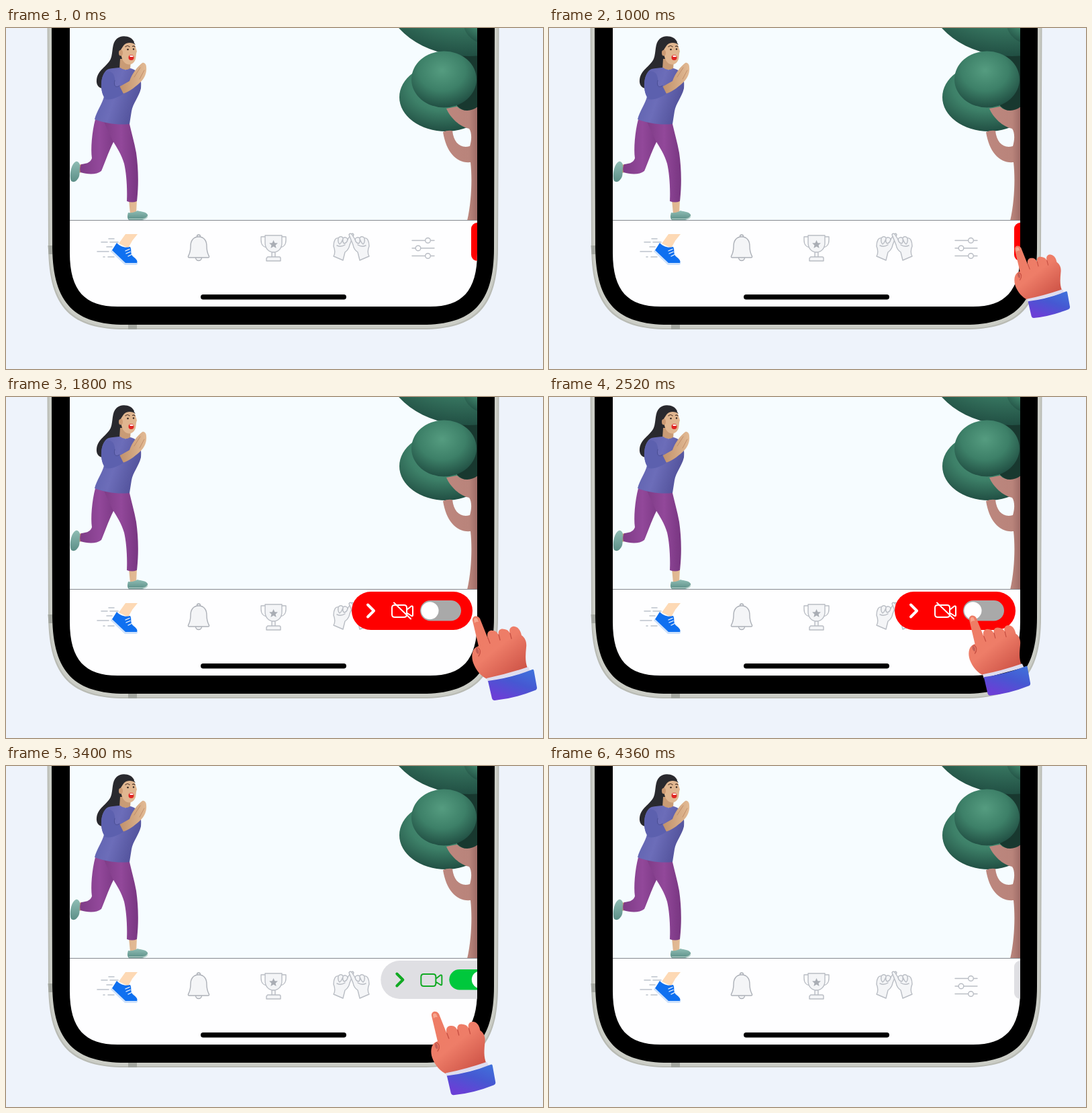
Animation, 800 px wide and 508 px high, one loop 4.4 s. Source, as an HTML page:

```html
<!DOCTYPE html>
<html lang="en">
<head>
<meta charset="utf-8">
<title>Running app tab bar</title>
<style>
  html, body { margin: 0; width: 100%; height: 100%; overflow: hidden; background: #eef3fb; }
  svg { display: block; width: 800px; height: 508px; }
  .line { fill: none; stroke-linecap: round; stroke-linejoin: round; }
  .icon { fill: #f4f5f7; stroke: #b9bdc4; stroke-width: 1.4; stroke-linecap: round; stroke-linejoin: round; }
</style>
</head>
<body>
<svg viewBox="0 0 800 508">
  <defs>
    <clipPath id="screen"><path d="M95 -1V335C95 392 118 415 166 415H632C679 415 702 392 702 335V-1Z"/></clipPath>
    <radialGradient id="leaf" cx=".47" cy=".34" r=".66">
      <stop offset="0" stop-color="#559c80"/><stop offset=".55" stop-color="#3d8068"/><stop offset="1" stop-color="#214f43"/>
    </radialGradient>
    <linearGradient id="bark"><stop offset="0" stop-color="#bd877e"/><stop offset=".75" stop-color="#b9847b"/><stop offset="1" stop-color="#9c6a65"/></linearGradient>
    <linearGradient id="shirt" x2="1" y2=".4"><stop offset="0" stop-color="#5a5eab"/><stop offset=".55" stop-color="#6c6db9"/><stop offset="1" stop-color="#53539c"/></linearGradient>
    <linearGradient id="pants"><stop offset="0" stop-color="#7f3c87"/><stop offset=".5" stop-color="#92489a"/><stop offset="1" stop-color="#783681"/></linearGradient>
    <linearGradient id="skin"><stop offset="0" stop-color="#bf8f69"/><stop offset="1" stop-color="#e3bb95"/></linearGradient>
    <linearGradient id="shoe" x2="0" y2="1"><stop offset="0" stop-color="#8fbdb4"/><stop offset="1" stop-color="#5c8f88"/></linearGradient>
    <linearGradient id="palm" x2=".7" y2="1"><stop offset="0" stop-color="#ee7c64"/><stop offset=".55" stop-color="#ee7d68"/><stop offset="1" stop-color="#cf5548"/></linearGradient>
    <linearGradient id="sleeve" x1="1" x2=".4" y2="1"><stop offset="0" stop-color="#3f74dc"/><stop offset=".5" stop-color="#4658d2"/><stop offset="1" stop-color="#6a3fd6"/></linearGradient>
  </defs>

  <!-- phone body -->
  <path fill="#b9bbb4" d="M61.500 -1L63 328C64 418 98 449 178 449H620C699 449 733 418 733 328L734.500 -1Z"/>
  <path fill="#cbcdc6" d="M63.500 -1L65 328C66 416 100 447 178 447H620C697 447 731 416 731 328L732.500 -1Z"/>
  <path fill="#a3a69f" d="M62.500 324H69V337H63.500ZM182 442H195V449H182Z"/>
  <path d="M68 -1L69 328C70 411 103 442 178 442H620C694 442 727 411 727 328L728 -1Z"/>

  <g clip-path="url(#screen)">
    <path fill="#f6fcff" d="M95 -1H703V287H95Z"/>
    <path fill="#fefeff" d="M95 286H703V416H95Z"/>

    <!-- tree -->
    <path fill="#18382f" d="M668 40H703V140H668Z"/>
    <ellipse cx="655" cy="103" rx="69" ry="51" fill="url(#leaf)"/>
    <path fill="#18382f" d="M676 60H703V124C692 128 680 124 672 116Z"/>
    <path fill="url(#bark)" d="M687 287C693 262 695 226 692 200C672 202 656 186 651 155Q657 152 665 153C667 171 677 180 691 176C694 166 694 156 690 150C676 147 662 134 656 120L672 117C680 125 694 125 703 117V287Z"/>
    <ellipse cx="690" cy="-50" rx="125" ry="92" fill="url(#leaf)"/>
    <ellipse cx="722" cy="-6" rx="40" ry="31" fill="url(#leaf)"/>
    <ellipse cx="652.500" cy="76.500" rx="48.500" ry="42" fill="url(#leaf)"/>

    <!-- runner -->
    <path fill="url(#skin)" d="M183 256H195L194 277H185ZM107 204L114 203 113 215 107 216Z"/>
    <path fill="url(#shoe)" d="M182 275C188 276 192 274 196 272C201 274 208 273 211 278C212 283 208 285 203 286H183C180 283 181 279 182 275Z"/>
    <path fill="url(#shoe)" d="M104 199C108 198 111 203 110 208C109 215 111 221 106 226C102 231 96 230 96 224C95 214 98 202 104 199Z"/>
    <path fill="none" stroke="#c3d8d2" stroke-width="1.200" d="M183 284.500H204Q210 284 211 280"/>
    <path fill="url(#pants)" d="M133 136C128 155 126 180 128 194C125 202 118 202 112 203Q109 209 111 215C121 218 135 219 142 213C146 204 152 186 160 170L168 144Z"/>
    <path fill="url(#pants)" d="M146 140L184 143C187 156 191 170 194 186C197 207 198 232 195 258Q188 261 180 258C181 236 179 215 176 202C172 188 165 178 159 168Z"/>
    <path fill="#29292e" d="M191 21C188 12 172 9 165 16C157 23 160 36 156 46C150 58 137 62 135 77C134 85 139 90 144 90C149 82 153 74 160 66C172 62 178 50 177 40Z"/>
    <path fill="#c99b75" d="M170 46H186L185 62H169Z"/>
    <path fill="url(#shirt)" d="M153 61C158 60 165 59 170 59Q177 65 185 60C196 62 203 72 201 90C198 103 189 112 187 124L184 143C166 145 148 142 132 136C135 124 144 112 146 102C139 92 141 65 153 61Z"/>
    <path fill="url(#skin)" d="M168 88L184 79C187 69 196 57 203 52C206 51 209 54 209 58C210 66 207 75 199 82C191 89 181 97 173 98Z"/>
    <path class="line" stroke="#b98560" stroke-width=".8" d="M200 59L191 73M206 63L199 76"/>
    <path fill="#5c60ae" d="M148 66C140 73 140 96 148 106C156 108 168 103 175 98L169 86C163 89 160 87 162 78C163 70 156 61 148 66Z"/>
    <path class="line" stroke="#4a4e94" d="M162 78C160 86 163 90 169 86"/>
    <path fill="#e0b690" d="M172 24C178 17 189 18 192 25C193 29 194 31 195 35C194 37 194 39 193.500 43C193 51 187 56 181 54C174 52 169 42 172 24Z"/>
    <ellipse cx="171" cy="37" rx="3" ry="4.500" fill="#cd9b74"/>
    <path fill="#29292e" d="M193 25C189 17 176 12 168 20L168 34C173 33 173 26 179 23C184 21 189 22 193 25Z"/>
    <path class="line" stroke="#4c3429" stroke-width="1.100" d="M178 28Q181 25 184 28M188.500 27.500Q190 26 192 28"/>
    <circle cx="181.500" cy="32" r="1.300" fill="#33251f"/><circle cx="190" cy="31.500" r="1.200" fill="#33251f"/>
    <ellipse cx="186.500" cy="44" rx="4" ry="4" fill="#e02624"/>
    <path fill="#fff" d="M184 41.500Q187 40 190 42L189 43H185Z"/>

    <path fill="#85898f" d="M95 286H703V287H95Z"/>

    <!-- running foot -->
    <path class="line" stroke="#bcc2cb" stroke-width="1.600" d="M142 319H151M155 319H167M153 314H161M136 333H153M157 333H160M150 326H158M145 341H147M152 341H161"/>
    <path fill="#fdd9b5" d="M178 307H196L188 317L182 328L168 321Z"/>
    <path fill="#cfe2fb" d="M158 330L156 333L177 353H194Q197 352 196 348Z"/>
    <path fill="#0f70f0" d="M165 320L158 331L178 350H195Q197 346 190 341C184 336 188 331 185 326C178 328 170 326 165 320Z"/>
    <path class="line" stroke="#fff" stroke-width="1.300" d="M178 332L184 329.500M179 336L185 333.500M182 340L187 337.500"/>

    <!-- bell -->
    <g class="icon" style="stroke:#adb1b8">
      <circle cx="287" cy="310.500" r="2.500"/><circle cx="287" cy="342" r="4.500"/>
      <path d="M287 311C279 311 275 317 275 325C275 334 273 337 271.500 340Q271 342 273 342H301Q303 342 302.500 340C301 337 299 334 299 325C299 317 295 311 287 311Z"/>
    </g>
    <!-- cup -->
    <g class="icon">
      <path fill="none" d="M387 311H380V316C380 323 384 327 390 327M410 311H417V316C417 323 413 327 407 327"/>
      <path d="M386 309H411V320C411 329 405 334 398.500 334S386 329 386 320ZM396 334H401V341H396ZM389 342Q389 341 390 341H407Q409 341 409 343V347H388V343Z"/>
      <path fill="#a9adb4" stroke="none" d="M398.500 316L400.400 320.200 405 320.600 401.500 323.600 402.600 328 398.500 325.600 394.400 328 395.500 323.600 392 320.600 396.600 320.200Z"/>
    </g>
    <!-- fists -->
    <g class="icon" id="fists">
      <path d="M488 340C491 335 490 330 488 325C488 317 491 312 495 313C497 310 501 310 502 313C505 311 508 312 509 315L514 307Q517 305 518 308L512 323C511 329 508 332 505 334L502 346Z"/>
      <path fill="none" d="M495 314Q494 319 497 322Q500 320 502 314M502 314Q501 320 504 321Q508 320 509 315M493 324Q499 327 505 323"/>
    </g>
    <use href="#fists" transform="matrix(-1 0 0 1 1029 0)"/>
    <!-- sliders -->
    <g class="icon" style="fill:#fefeff">
      <path d="M605 316.500H638M605 328H638M605 339.500H638"/>
      <circle cx="628.500" cy="316.500" r="3.800"/><circle cx="614" cy="328" r="3.800"/><circle cx="628.500" cy="339.500" r="3.800"/>
    </g>

    <rect x="290" y="397" width="217" height="7.500" rx="3.700"/>

    <!-- camera switch panel, drawn in its open place -->
    <g id="panel">
      <rect id="pill" x="515" y="290" width="180" height="57"/>
      <g id="mark" class="line">
        <path stroke-width="4" d="M539 309.500L548 318.500L539 327.500"/>
        <path stroke-width="2" d="M579 310H593Q597 310 597 314V324Q597 328 593 328H579Q575 328 575 324V314Q575 310 579 310ZM597 317L604 311.500Q606 311 606 313V325Q606 327 604 326L597 321.500"/>
      </g>
      <path id="slash" class="line" stroke-width="2" d="M578 306.500L603 330.500"/>
      <rect id="track" x="617" y="303" width="61" height="30.500" rx="15.200"/>
      <circle id="knob" cy="318.300" r="13" fill="#fff"/>
    </g>
  </g>

  <!-- hand, drawn from its own top left corner -->
  <g id="hand">
    <path fill="url(#palm)" d="M1 7C0 0 8 -2 12 4L24 34C21 25 26 21 31 22C36 22 38 25 40 29C38 21 43 18 49 20C54 21 56 24 57 27C54 19 59 15 64 16C70 17 73 23 74 29C80 33 82 40 81 47C80 58 79 68 83 78L25 95C14 91 6 81 2 70C-1 61 0 51 6 47L10 45Z"/>
    <path class="line" stroke="#c64f42" stroke-width="1.300" d="M24 33L27 41M40 28L42 36M57 26L59 34M8 47C13 49 14 55 10 60"/>
    <path fill="#8e3940" opacity=".45" d="M6 47Q12 50 10 57Q5 56 6 47Z"/>
    <path fill="#f9b09a" opacity=".8" d="M3 5Q5 2 8 4L10 9Q6 8 4 11Z"/>
    <path fill="#dedcee" d="M22 93Q52 87 84 76L87 82L24 99Z"/>
    <path fill="url(#sleeve)" d="M24 97Q57 93 90 80Q92 79 92.500 82L97 107Q97 110 94 111Q64 123 34 126Q31 126 30 123Z"/>
  </g>
</svg>
<script>
const LOOP = 4400;
const SHIFT = 178;
const el = id => document.getElementById(id);
const [panel, pill, mark, slash, track, knob, hand] =
  ['panel', 'pill', 'mark', 'slash', 'track', 'knob', 'hand'].map(el);

// time, x, y, scale
const HAND = [
  [0, 830, 326, 1], [590, 694, 326, 1], [700, 694, 326, 1],
  [960, 693, 324, .857], [1080, 693, 324, .857], [1440, 694, 326, 1],
  [1840, 694, 326, 1], [2260, 625, 325, 1], [2340, 625, 325, 1],
  [2520, 625, 325, .95], [2580, 625, 325, .95], [2920, 625, 319, .99],
  [3176, 625, 319, .99], [3821, 658, 509, 1], [LOOP, 658, 512, 1]
];

const ease = p => p < .5 ? 2 * p * p : 1 - 2 * (1 - p) ** 2;
const span = (t, a, b) => ease(Math.min(1, Math.max(0, (t - a) / (b - a))));
const mix = (a, b, p) => a + (b - a) * p;
const blend = (a, b, p) => `rgb(${a.map((v, i) => Math.round(mix(v, b[i], p)))})`;

function pose(t) {
  const i = Math.max(1, HAND.findIndex(k => k[0] >= t));
  const a = HAND[i - 1], b = HAND[i], p = span(t, a[0], b[0]);
  return [1, 2, 3].map(n => mix(a[n], b[n], p));
}

function draw(t) {
  const [x, y, s] = pose(t);
  hand.setAttribute('transform', `translate(${x} ${y}) scale(${s})`);

  const open = span(t, 1080, 1725) - span(t, 3176, 3821);
  panel.setAttribute('transform', `translate(${SHIFT * (1 - open)} 0)`);
  pill.setAttribute('rx', mix(9, 28.5, Math.min(1, open * 1.3)));

  const on = span(t, 2600, 2900);
  const ink = blend([255, 255, 255], [18, 170, 36], on);
  pill.setAttribute('fill', blend([255, 0, 0], [223, 223, 227], on));
  mark.setAttribute('stroke', ink);
  slash.setAttribute('stroke', ink);
  slash.setAttribute('opacity', 1 - on);
  track.setAttribute('fill', blend([169, 169, 169], [0, 200, 60], on));
  knob.setAttribute('cx', mix(631.5, 663.5, on));
}

const start = performance.now();
function tick() {
  draw((performance.now() - start) % LOOP);
  requestAnimationFrame(tick);
}
tick();
</script>
</body>
</html>
```
